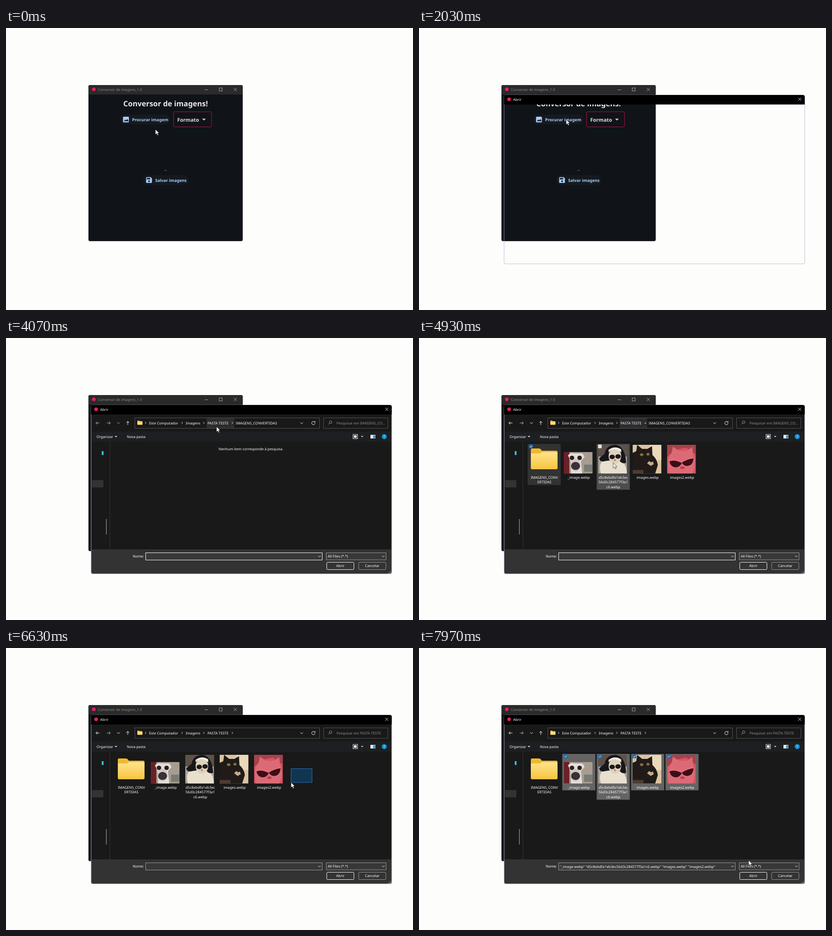
An HTML page for the animation above (8 s loop, 899 px wide and 623 px high).

```html
<!DOCTYPE html>
<html lang="pt">
<head>
<meta charset="utf-8">
<title>Conversor de imagens</title>
<style>
html, body { margin: 0; width: 100%; height: 100%; overflow: hidden; background: #fdfdfc; }
#stage { display: block; width: 100vw; height: 100vh; }
text { font: 7.85px "Noto Sans", "Open Sans", sans-serif; fill: #fff; white-space: pre; text-rendering: geometricPrecision; }
.mid { text-anchor: middle; }
.end { text-anchor: end; }
.line { fill: none; stroke: #fff; stroke-width: 1; }
</style>
</head>
<body>
<svg id="stage" viewBox="0 0 899 623" preserveAspectRatio="none"></svg>
<script>
const text = (x, y, s, attrs = '') => `<text x="${x}" y="${y}" ${attrs}>${s}</text>`;
const rect = (x, y, w, h, fill, attrs = '') =>
  `<rect x="${x}" y="${y}" width="${w}" height="${h}" fill="${fill}" ${attrs}/>`;
const box = (x, y, w, h, stroke, attrs = '') => rect(x, y, w, h, 'none', `stroke="${stroke}" ${attrs}`);
const shape = (d, fill) => `<path d="${d}" fill="${fill}"/>`;
const line = (d, attrs = '') => `<path class="line" d="${d}" ${attrs}/>`;
const disc = (x, y, r, fill) => `<circle cx="${x}" cy="${y}" r="${r}" fill="${fill}"/>`;
const oval = (x, y, rx, ry, fill) => `<ellipse cx="${x}" cy="${y}" rx="${rx}" ry="${ry}" fill="${fill}"/>`;
const group = (id, body) => `<g id="${id}">${body}</g>`;
const right = (x, y = 187.5) => line(`M${x - 1} ${y - 2}l2 2l-2 2`);
const down = (x, y, s = 3) => line(`M${x - s} ${y - s / 2}l${s} ${s}l${s} ${-s}`);
const cross = (x, y, stroke) => line(`M${x - 3.5} ${y - 3.5}l7 7m0 -7l-7 7`, `style="stroke:${stroke}"`);
const caretDown = (x, y, w, fill) => shape(`M${x} ${y}h${w}l${-w / 2} ${w / 2}z`, fill);
const bold = (size, fill, weight = 700) => `style="font-size:${size}px;font-weight:${weight};fill:${fill}"`;

const app = rect(182, 126, 341, 345, '#101318', 'rx="4"')
  + `<path id="bar" d="M182 147v-17q0-4 4-4h333q4 0 4 4v17z"/>`
  + box(182.5, 126.5, 340, 344, '#2c2e31', 'rx="4"')
  + disc(194, 135.5, 4, '#e0205f')
  + text(203, 138.8, 'Conversor de imagens_1.0', 'id="caption"')
  + line('M439 136.5h7.500', 'style="stroke:#aaa"') + box(471, 132.5, 6.5, 6.5, '#aaa')
  + cross(506.5, 135.8, '#aaa')
  + text(352.5, 173, 'Conversor de imagens!', `class="mid" ${bold(16.4, '#e8e9ec')}`)
  + rect(252, 191, 110, 22, '#151a20', 'rx="11"')
  + rect(258.5, 196, 13, 12.5, '#a9cdf8', 'rx="1.500"')
  + shape('M260.500 206l3-4l2 2.300l2.500-3.300l3 5z', '#13202e')
  + text(278.5, 205.7, 'Procurar imagem', bold(9.2, '#a9cdf8', 600))
  + box(370, 185, 84, 33.5, '#b01645', 'rx="3"')
  + text(378.3, 206.8, 'Formato', bold(11.3, '#dcdee3'))
  + caretDown(433, 200.3, 8.4, '#c8cad0')
  + text(352.5, 315, '...', 'class="mid"')
  + rect(303, 325, 100, 22, '#151a20', 'rx="11"')
  + shape('M311 329.500h8.500l2.800 2.800v8.700q0 1.300-1.300 1.300h-10q-1.500 0-1.500-1.300v-10q0-1.500 1.500-1.500z', '#a9cdf8')
  + rect(311, 331.3, 7.5, 3.2, '#13202e') + disc(316, 338.6, 2, '#13202e')
  + text(329.5, 339.5, 'Salvar imagens', bold(9.1, '#a9cdf8', 600));

const frame = box(188, 148, 664, 373, '#a9a9c8', 'rx="4" opacity=".75"')
  + shape('M188 169v-17q0-4 4-4h656q4 0 4 4v17z', '#000')
  + disc(199, 157.5, 4, '#e0205f') + text(208, 160.8, 'Abrir') + cross(841, 157.5, '#ddd');

const panel = shape('M188 169h664v348q0 4-4 4h-656q-4 0-4-4z', '#191919')
  + rect(188, 207, 664, 22, '#1e1f21')
  + shape('M188 467h664v50q0 4-4 4h-656q-4 0-4-4z', '#333')
  + box(188.500, 148.500, 663, 372, '#48484c', 'rx="4"');

const smallFolder = shape('M290 183.500q0-1 1-1h3l1.300 1.300h5q1 0 1 1v5.700q0 1-1 1h-9.300q-1 0-1-1z', '#f5c33b')
  + rect(290, 185.3, 11.3, 6.2, '#ffdd73', 'rx="1"');

const controls = group('back', line('M206.500 187.800h-8m3.300-3.300l-3.300 3.300l3.300 3.300') + down(248.5, 187.8))
  + line('M222.500 187.800h8m-3.300-3.300l3.300 3.300l-3.300 3.300', 'opacity=".7"')
  + line('M269 192v-8m-3.300 3.300l3.300-3.300l3.300 3.300')
  + box(284.5, 176.5, 408, 23, '#535353')
  + rect(443, 177, 61, 22, '#2d2d2f', 'id="crumbHover"')
  + smallFolder + right(308.5) + text(316, 190.7, 'Este Computador') + right(389)
  + text(397, 190.7, 'Imagens') + right(437) + text(445, 190.7, 'PASTA TESTE')
  + group('crumbRight', right(500)) + group('crumbDown', down(500, 188, 2))
  + text(507.5, 190.7, 'IMAGENS_CONVERTIDAS', 'id="lastCrumb"')
  + down(653, 188) + line('M681.800 185.500a3.700 3.700 0 1 0 .900 2.500m.100-4.200v2.300h-2.400')
  + box(701.5, 176.5, 142, 23, '#535353')
  + line('M712 191l2.800-2.800', 'opacity=".55"')
  + '<circle class="line" cx="717" cy="186" r="2.800" opacity=".55"/>'
  + text(730, 190.7, '', 'id="search" style="fill:#8e8e8e"')
  + text(200, 220.8, 'Organizar') + caretDown(240, 216.5, 6, '#ddd') + text(267, 220.8, 'Nova pasta')
  + box(766.5, 213, 10, 9.5, '#e8e8e8') + rect(768.5, 215, 6, 5.5, '#fff')
  + caretDown(784, 216.5, 5.5, '#ddd')
  + rect(805, 214, 11, 8, '#e8eef4') + rect(811, 215, 4.5, 6.5, '#2b8fd8')
  + disc(835.5, 217.8, 5.6, '#0f94d8') + text(835.5, 220.8, '?', 'class="mid"')
  + rect(229, 229, 1, 238, '#353535') + rect(211.5, 250, 4, 8.5, '#35c3dc')
  + rect(190, 314, 25, 16, '#333') + rect(221, 400, 1.2, 34, '#a0a0a0')
  + text(304.5, 485.3, 'Nome:', 'class="end"')
  + rect(308.5, 474.5, 390, 16, '#383838', 'id="field"')
  + text(311, 485.6, '', 'id="names"') + rect(311, 476, 1, 12, '#fff', 'id="caret"')
  + down(692.5, 482.5, 2.7)
  + rect(707.5, 474.5, 132, 15.5, '#383838', 'stroke="#9b9b9b"')
  + text(710.5, 485.3, 'All Files (*.*)') + down(833.5, 482.3, 2.7)
  + rect(708.5, 495.5, 60, 16, '#333', 'stroke="#fff" rx="2"') + text(738.5, 506.3, 'Abrir', 'class="mid"')
  + rect(779, 495.5, 60, 16, '#333', 'stroke="#9b9b9b" rx="2"') + text(809, 506.3, 'Cancelar', 'class="mid"')
  + [[849, 514.5], [849, 517], [846.5, 517], [849, 519], [846.5, 519], [844, 519]]
    .map(([x, y]) => rect(x, y, 1.2, 1.2, '#bbb')).join('');

const bigFolder = shape('M247 247q0-3 3-3h15q3 0 4.500 2.500l1.800 2.500h31.700q3 0 3 3v20h-59z', '#f0b92d')
  + '<path d="M247 258q0-3 3-3h17l5-3h31q3 0 3 3v32q0 3-3 3h-53q-3 0-3-3z" fill="url(#gold)"/>';

// Each picture lives in a 64-unit wide box.
const pictures = [
  rect(0, 0, 64, 48, '#a89c90') + rect(0, 0, 12, 48, '#6b2027') + rect(45, 28, 19, 16, '#777c74')
    + shape('M9 7q8-7 14-4h12q8-2 11 8l-8 9l3 28h-25l-1-28z', '#e3ddda')
    + disc(18, 13, 5, '#25201e') + disc(35, 13, 5, '#25201e')
    + oval(26, 29, 11, 14, '#d3c5c0') + oval(26, 31, 10, 9, '#383236'),
  rect(0, 0, 64, 64, '#aaa39a') + rect(0, 0, 64, 26, '#5d5148')
    + shape('M6 64q-8-24 10-34l32 0q14 12 16 34z', '#e8dfce')
    + shape('M14 20q3-19 24-20q22 3 24 40q-12 4-16-8l-30 4q-12 4-14-6z', '#17171b')
    + oval(37, 25, 14, 17, '#dfd1bb') + shape('M23 17q12-14 28 0v-7q-14-9-28 1z', '#f2ece2')
    + oval(31, 27, 6, 5, '#1c1a1c') + oval(44, 26, 6, 5, '#1c1a1c') + disc(37, 34, 2.2, '#b58275'),
  rect(0, 0, 64, 64, '#dbc4a0') + rect(38, 0, 26, 34, '#ead8ba')
    + shape('M0 64v-46l8-4l2-14l11 9h12l10-6l1 20q10 8 12 22l-6 19z', '#201b19')
    + oval(20, 22, 4, 3, '#807040') + oval(34, 21, 3.500, 3, '#807040')
    + shape('M32 41l5-5l4 3l4-2l2 6l-7 4z', '#c9a98b') + rect(0, 56, 24, 8, '#4c3c32'),
  rect(0, 0, 64, 64, '#d65562') + shape('M0 0h64v22l-22-16l-24 5l-18 16z', '#a8414c')
    + shape('M4 64q-6-34 6-46l3-14l13 9h18l12-8l2 20q8 18-2 39z', '#dc6a76')
    + shape('M5 36q11-6 27 3q13-10 27-10q-1 17-14 18q-8 0-12-7q-5 11-16 10q-10-2-12-14z', '#3b0e18')
    + line('M5 36q11-5 27 3q13-9 27-10', 'style="stroke:#ef7480;stroke-width:2"')
    + oval(34, 51, 5, 3, '#b5404e')
];
const files = [
  { name: ['_image.webp'], top: 252, h: 48 },
  { name: ['d5c8ebdfa1eb3ec', '56d3c284577f3a1', 'c6.webp'], top: 236, h: 64 },
  { name: ['images.webp'], top: 236, h: 64 },
  { name: ['images2.webp'], top: 236, h: 64 }
];
const label = (x, rows) => rows.map((s, i) => text(x, 311 + i * 10.4, s, 'class="mid"')).join('');
const tile = (id, x, rows, fill) => rect(x, 234, 73, 70 + rows * 10.4, fill, `id="${id}"`);
const check = (id, x) => group(id, rect(x + 3, 235.500, 8.500, 8, '#0f6fc6', 'rx="1"')
  + line(`M${x + 5} 239.500l1.800 1.800l3-3.500`));
const items = tile('folderTile', 240, 2, '#323232') + bigFolder + check('folderCheck', 240)
  + label(277, ['IMAGENS_CONV', 'ERTIDAS'])
  + files.map((f, i) => {
    const x = 316.5 + 76 * i;
    return tile('tile' + i, x, f.name.length, '#646464')
      + `<svg x="${x + 3.5}" y="${f.top}" width="63.500" height="${f.h - .5}" viewBox="0 0 64 ${f.h}">${pictures[i]}</svg>`
      + check('check' + i, x) + label(x + 36.5, f.name);
  }).join('')
  + rect(395.5, 235.5, 8, 8, '#e8e8e8', 'id="hoverBox" rx="1"');

document.getElementById('stage').innerHTML =
  '<defs><linearGradient id="gold" x2="0" y2="1"><stop stop-color="#ffe38b"/><stop offset="1" stop-color="#f6c53f"/></linearGradient></defs>'
  + rect(0, 0, 899, 623, '#fdfdfc') + app
  + group('dialog', group('panel', panel) + frame + group('controls', controls)
    + text(541, 248, 'Nenhum item corresponde à pesquisa.', 'class="mid" id="empty"')
    + group('items', items))
  + rect(0, 0, 0, 0, '#06b', 'id="band" fill-opacity=".34" stroke="#2476b8"')
  + '<path id="cursor" d="M0 0v11.500l2.700-2.500l2 4.300l2-.900l-2-4.200h3.700z" fill="#fff" stroke="#111" stroke-width=".7"/>';

const el = {};
document.querySelectorAll('[id]').forEach(e => el[e.id] = e);
const show = (id, on) => el[id].style.display = on ? '' : 'none';
const set = (id, attrs) => { for (const k in attrs) el[id].setAttribute(k, attrs[k]); };
const write = (id, s) => { if (el[id].textContent !== s) el[id].textContent = s; };
const within = (t, a, b) => t >= a && t < b;

const DRAG = 6570, DROP = 7560, START = [676, 266.5];
const path = [
  [0, 330, 224], [730, 330, 224], [900, 325, 202], [3970, 325, 202], [4070, 465, 196],
  [4770, 465, 196], [4920, 429, 276], [5400, 429, 276], [6130, ...START], [DRAG, ...START],
  [6630, 630, 297], [7230, 394, 353], [7450, 318, 362], [DROP, 318, 362], [7960, 728, 469], [8000, 728, 469]
];
function cursorAt(t) {
  const i = path.findIndex(p => p[0] > t), [a, x, y] = path[i - 1], [b, u, v] = path[i];
  let k = (t - a) / (b - a);
  if (!within(t, DRAG, 7450)) k = k * k * (3 - 2 * k);
  return [x + (u - x) * k, y + (v - y) * k];
}

function render(now) {
  const t = now % 8000, [x, y] = cursorAt(t);
  set('cursor', { transform: `translate(${x} ${y})` });

  const active = within(t, 930, 1130);
  set('bar', { fill: active ? '#000' : '#2a2a2a' });
  el.caption.style.fill = active ? '#fff' : '#8b8b8b';

  show('dialog', t >= 1870);
  set('dialog', { opacity: Math.min(1, (t - 1870) / 120) });
  show('panel', t >= 2100);
  show('controls', t >= 2200);

  const listed = t >= 4830, moved = t >= 4990, focused = t < 6150;
  show('empty', within(t, 2600, 4830));
  show('items', listed);
  set('back', { opacity: listed ? 1 : .7 });
  show('crumbHover', within(t, 4040, 4990));
  show('crumbDown', within(t, 4600, 4990));
  show('crumbRight', !within(t, 4600, 4990));
  show('lastCrumb', !moved);
  write('search', 'Pesquisar em ' + (moved ? 'PASTA TESTE' : 'IMAGENS_CO...'));
  set('field', { stroke: focused ? '#fff' : '#9b9b9b' });
  show('caret', within(t, 2900, 3670) || within(t, 4200, 4730) || within(t, 5230, 5790));
  show('folderTile', focused);
  show('folderCheck', focused);

  const reach = t < DRAG ? 899 : t < DROP ? x : 318, chosen = [];
  const hover = x > 392 && x < 465 && y > 234 && y < 335 && t < DRAG;
  files.forEach((f, i) => {
    const on = reach < 383 + 76 * i, lit = hover && i === 1;
    if (on) chosen.push(`"${f.name.join('')}"`);
    show('tile' + i, on || lit);
    set('tile' + i, { fill: on ? '#646464' : '#4d4d4d' });
    show('check' + i, on);
  });
  show('hoverBox', hover);
  write('names', chosen.join(' '));

  show('band', within(t, DRAG, DROP));
  set('band', { x, y: START[1], width: Math.max(0, START[0] - x), height: Math.max(0, y - START[1]) });
  requestAnimationFrame(render);
}
requestAnimationFrame(render);
</script>
</body>
</html>
```
